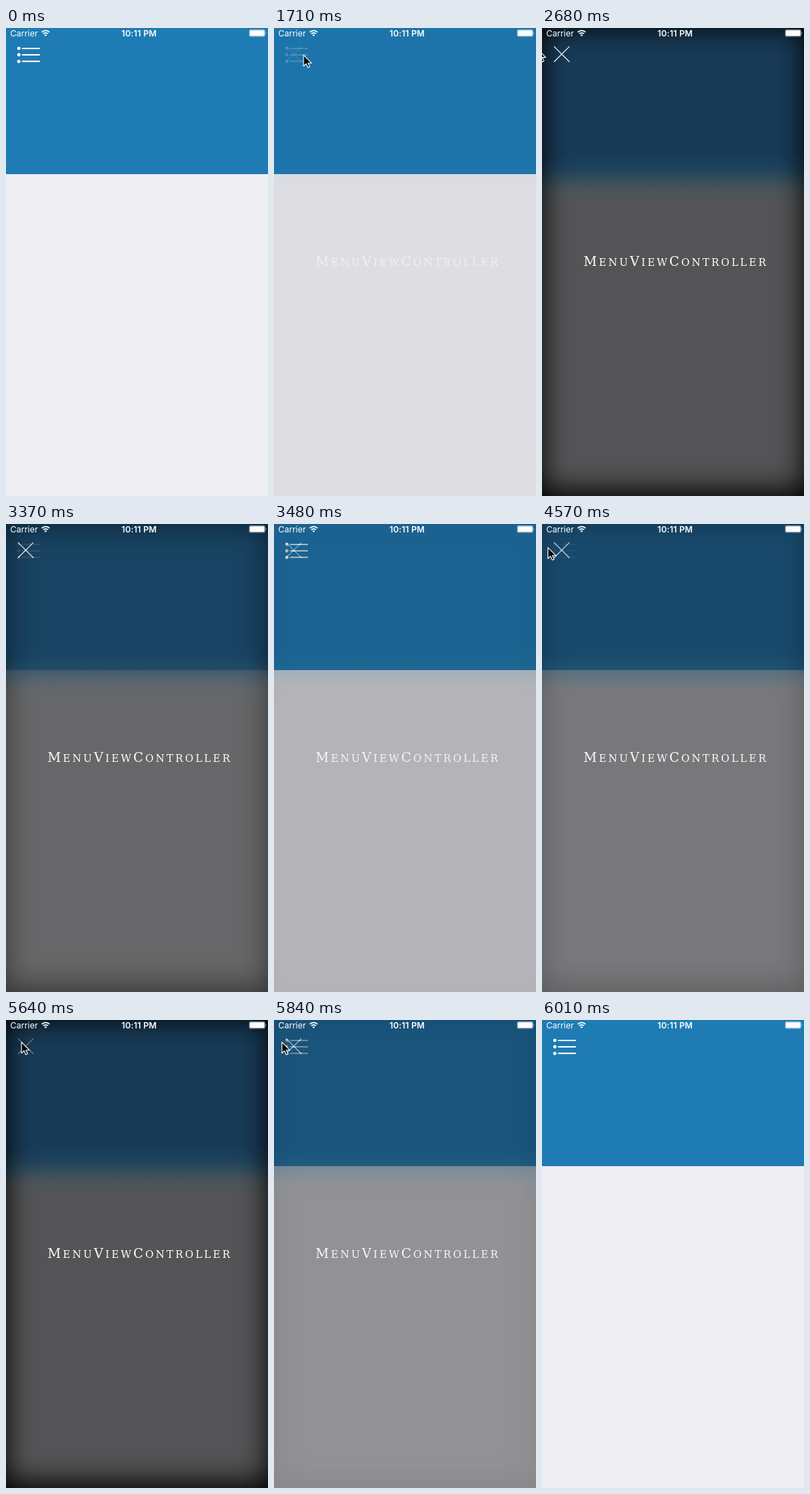
Animation, 372 px wide and 663 px high, one loop 7350 ms. Source, as an HTML page:

```html
<!DOCTYPE html>
<html lang="en">
<head>
<meta charset="utf-8">
<title>Menu fade</title>
<style>
  html, body { margin: 0; width: 100%; height: 100%; overflow: hidden; background: #efeef3; }
  svg { display: block; width: 100%; height: 100%; }
  .status { font-family: Inter, Roboto, sans-serif; font-size: 12px; fill: #fff; }
  .title { font-family: "DejaVu Serif", "Noto Serif", serif; font-size: 14.4px; letter-spacing: 2.9px; fill: #fff; }
  .title .cap { font-size: 18.5px; }
</style>
</head>
<body>
<svg viewBox="0 0 372 663" xmlns="http://www.w3.org/2000/svg">
  <defs>
    <linearGradient id="dark" gradientUnits="userSpaceOnUse" x1="0" y1="180" x2="0" y2="248">
      <stop offset="0" stop-color="#183b57"/>
      <stop offset=".3" stop-color="#1f435b"/>
      <stop offset=".52" stop-color="#364d5c"/>
      <stop offset=".75" stop-color="#4d5459"/>
      <stop offset="1" stop-color="#545456"/>
    </linearGradient>
    <filter id="soft" filterUnits="userSpaceOnUse" x="-120" y="-120" width="612" height="903">
      <feGaussianBlur stdDeviation="20"/>
    </filter>
  </defs>

  <rect width="372" height="663" fill="#efeef3"/>
  <rect width="372" height="207" fill="#1e7bb4"/>
  <g id="list" fill="#fff">
    <circle cx="18.2" cy="28.8" r="2.4"/>
    <circle cx="18.2" cy="38" r="2.4"/>
    <circle cx="18.2" cy="47.4" r="2.4"/>
    <path d="M23.5 29H47.3M23.5 38H47.3M23.5 47.2H47.3" stroke="#fff" stroke-width="2.1" stroke-linecap="round"/>
  </g>

  <g id="menu">
    <rect width="372" height="663" fill="url(#dark)"/>
    <path id="edge" d="M-120-120H492V783H-120ZM0 0V655H372V0Z" fill-rule="evenodd" filter="url(#soft)"/>
    <path id="cross" d="M17 26.2L39 48M39 26.2L17 48" stroke="#fff" stroke-width="1.1"/>
    <text class="title" x="190" y="337" text-anchor="middle"><tspan class="cap">M</tspan>ENU<tspan class="cap">V</tspan>IEW<tspan class="cap">C</tspan>ONTROLLER</text>
  </g>

  <g class="status">
    <text x="6" y="11.5">Carrier</text>
    <text x="189" y="11.5" text-anchor="middle" font-weight="600" letter-spacing=".15">10:11 PM</text>
    <g fill="none" stroke="#fff" stroke-width="1.7">
      <path d="M50.6 5.9A8 8 0 0 1 61.8 5.9"/>
      <path d="M52.8 8.2A4.8 4.8 0 0 1 59.6 8.2"/>
    </g>
    <path d="M56.2 11.8L54.3 9.9A2.7 2.7 0 0 1 58.1 9.9Z"/>
    <rect x="345.5" y="2.5" width="22" height="9.4" rx="1.4" fill="none" stroke="#fff" stroke-opacity=".5"/>
    <rect x="346.2" y="3.2" width="20.6" height="8" rx=".8"/>
    <path d="M368.6 5.5Q370.2 7.2 368.6 8.9Z"/>
  </g>

  <path id="cursor" d="M0 0V15.6L3.6 12.2L6.1 17.7L8.7 16.6L6.2 11.3H11.2Z" stroke="#fff" stroke-width="1.1" stroke-linejoin="round"/>
</svg>
<script>
const LOOP = 7350;
const OFF = -14;
const [list, menu, edge, cross, cursor] =
  ["list", "menu", "edge", "cross", "cursor"].map(id => document.getElementById(id));

// Each visit: pointer enters, clicks (press), leaves; the menu fades meanwhile.
const visits = [
  { enter: 1095, rest: 1230, leave: 1780, gone: 1910, from: [-10, 42], to: [42, 38.4], press: 1650, release: 2000, fade: 1648, span: 320, open: true },
  { enter: 2672, rest: 2810, leave: 3170, gone: 3310, from: [-11, 30], to: [29.5, 32.4], press: 3080, release: 3290, fade: 3305, span: 300, open: false },
  { enter: 3955, rest: 4150, leave: 4480, gone: 4610, from: [-10, 39], to: [30, 33.4], press: 4330, release: 4700, fade: 4353, span: 320, open: true },
  { enter: 5035, rest: 5310, leave: 5770, gone: 5900, from: [-10, 31], to: [22, 31.4], press: 5640, release: 5720, fade: 5710, span: 300, open: false }
];

const progress = (t, a, b) => Math.min(1, Math.max(0, (t - a) / (b - a)));
const smooth = p => p * p * (3 - 2 * p);
const easeOut = p => 1 - (1 - p) * (1 - p);
const mix = (a, b, p) => a + (b - a) * p;

function pointerAt(t, v) {
  const p = easeOut(progress(t, v.enter, v.rest));
  const q = progress(t, v.leave, v.gone) ** 2;
  return [
    mix(mix(v.from[0], v.to[0], p), OFF, q),
    mix(v.from[1], v.to[1], p)
  ];
}

function draw(t) {
  let shown = 0, listAlpha = 1, crossAlpha = 1, tip = null;
  for (const v of visits) {
    const p = smooth(progress(t, v.fade, v.fade + v.span));
    shown += v.open ? p : -p;
    if (t >= v.press && t < v.release) {
      if (v.open) listAlpha = 0.2;
      else crossAlpha = 0.38;
    }
    if (t >= v.enter && t < v.gone) tip = pointerAt(t, v);
  }
  list.setAttribute("opacity", listAlpha);
  cross.setAttribute("opacity", crossAlpha);
  menu.setAttribute("opacity", shown);
  edge.setAttribute("opacity", shown ** 3);
  cursor.setAttribute("visibility", tip ? "visible" : "hidden");
  if (tip) cursor.setAttribute("transform", `translate(${tip})`);
}

function tick() {
  draw(performance.now() % LOOP);
  requestAnimationFrame(tick);
}
tick();
</script>
</body>
</html>
```
